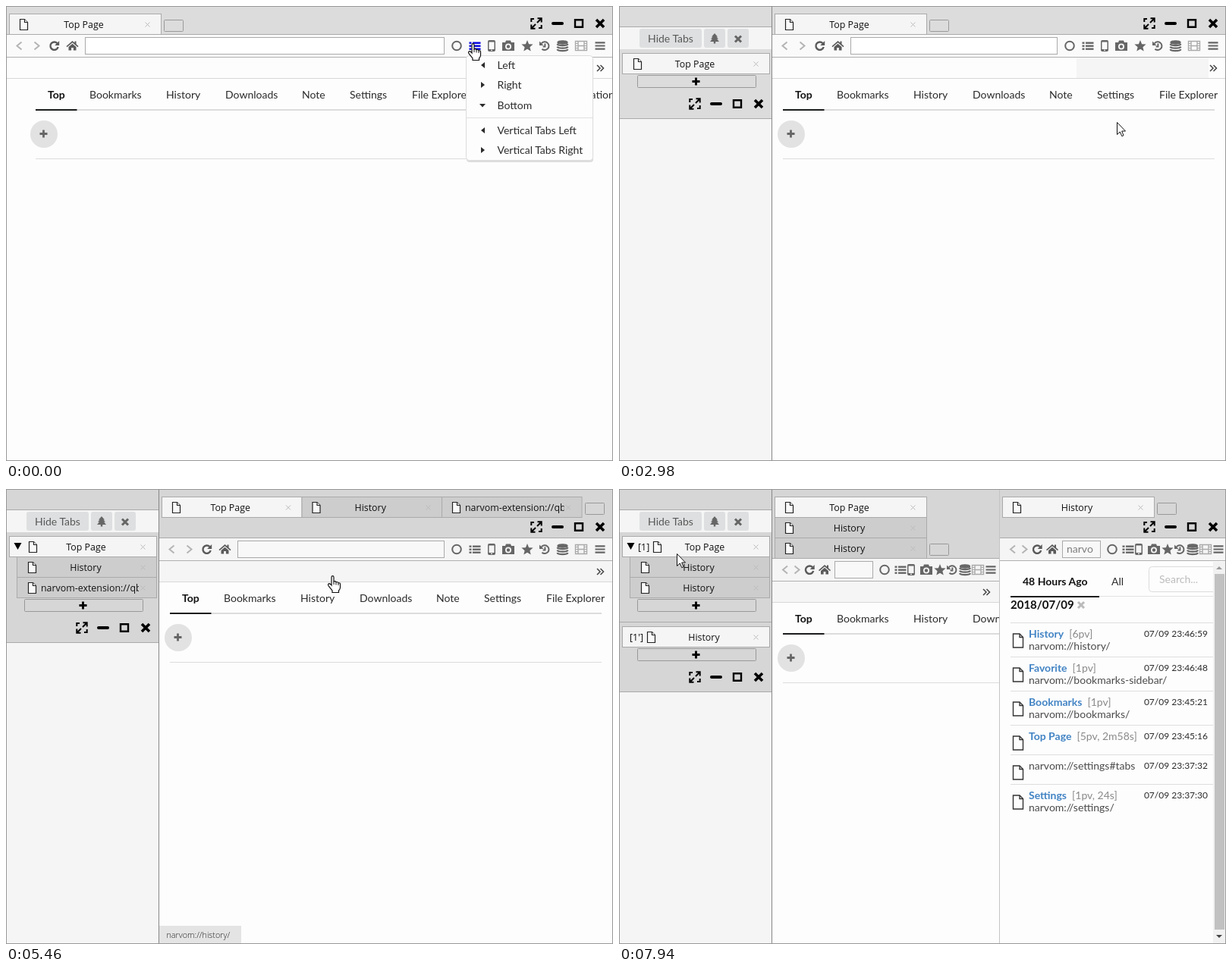
Recreate the animation shown at these times as an HTML page. Size 800 by 600 pixels, loop 8 s.

```html
<!DOCTYPE html>
<html lang="en">
<head>
<meta charset="utf-8">
<title>Vertical tabs</title>
<style>
html, body { margin: 0; width: 100%; height: 100%; overflow: hidden; background: #fdfdfd; }
#stage { display: block; width: 800px; height: 600px; }
text { font: 14px Lato, sans-serif; fill: #2b2b2b; white-space: pre; }
.ui { font: 12.4px "Open Sans", "Noto Sans", sans-serif; fill: #111; }
.status { font: 300 10.8px "Open Sans", "Noto Sans", sans-serif; fill: #222; }
.bold { font-weight: 700; fill: #111; }
.mid { text-anchor: middle; }
.end { text-anchor: end; }
</style>
</head>
<body>
<svg id="stage" viewBox="0 0 800 600"></svg>
<script>
const LOOP = 8000;
const SCHEME = 'narvom';
const EXT = SCHEME + '-extension://qbltmw';
const WHITE = '#fdfdfd', PALE = '#f5f5f5', EDGE = '#999';

// start time, pointer kind, pointer left, pointer top
const STEPS = [
  [0, 'hand', 609, 49], [500, 'arrow', 653, 148], [1000, 'hand', 672, 157],
  [1990, 'arrow', 677, 156], [2490, 'arrow', 667, 154], [2980, 'arrow', 656, 153],
  [3480, 'hand', 435, 120], [3970, 'hand', 424, 114], [4480, 'hand', 424, 114],
  [4960, 'hand', 424, 114], [5460, 'hand', 424, 114], [5960, 'arrow', 428, 114],
  [6460, 'hand', 416, 152], [6950, 'hand', 416, 152], [7450, 'hand', 416, 152],
  [7940, 'arrow', 76, 85]
];

const text = (x, y, s, cls = '', more = '') => `<text x="${x}" y="${y}" class="${cls}" ${more}>${s}</text>`;
const fill = (x, y, w, h, c, r = 0) => `<rect x="${x}" y="${y}" width="${w}" height="${h}" fill="${c}" rx="${r}"/>`;
const box = (x, y, w, h, c, edge, r = 0) =>
  `<rect x="${x + .5}" y="${y + .5}" width="${w - 1}" height="${h - 1}" fill="${c}" stroke="${edge}" rx="${r}"/>`;
const line = (d, w = 2, c = 'currentColor') => `<path d="${d}" fill="none" stroke="${c}" stroke-width="${w}"/>`;
const solid = (d, c = 'currentColor') => `<path d="${d}" fill="${c}" fill-rule="evenodd"/>`;
const clip = (x, y, w, h, s) => `<svg x="${x}" y="${y}" width="${w}" height="${h}" viewBox="${x} ${y} ${w} ${h}">${s}</svg>`;

const starPath = 'M' + Array.from({ length: 10 }, (_, i) => {
  const a = i * Math.PI / 5, r = i % 2 ? 3.6 : 8;
  return `${(r * Math.sin(a)).toFixed(1)} ${(.6 - r * Math.cos(a)).toFixed(1)}`;
}).join('L') + 'Z';

const rows = (x, w) => [-5, -1, 3].map(y => fill(x, y, w, 2.4, 'currentColor')).join('');

const ICONS = {
  back: line('M3 -5L-3 0L3 5'),
  next: line('M-3 -5L3 0L-3 5'),
  reload: line('M4 -3.4A5.2 5.2 0 1 0 5.2 1.5', 2.4) + solid('M6.7 -6.5V-.5H.7Z'),
  home: solid('M0 -6.5L3 -4V-6H5V-2.2L8 .5L7 1.8L0 -4.2L-7 1.8L-8 .5ZM-5 1.5L0 -2.7L5 1.5V6H1.4V2.4H-1.4V6H-5Z'),
  ring: line('M-5.8 0A5.8 5.8 0 1 1 5.8 0A5.8 5.8 0 1 1 -5.8 0Z'),
  list: rows(-7.5, 3) + rows(-3, 10.5),
  phone: solid('M-3 -7.5H3Q5 -7.5 5 -5.5V5.5Q5 7.5 3 7.5H-3Q-5 7.5 -5 5.5V-5.5Q-5 -7.5 -3 -7.5ZM-3.5 -5V4.5H3.5V-5ZM-1 5.3V6.5H1V5.3Z'),
  camera: solid('M-8 -4.5H-4L-3 -7H3L4 -4.5H8V6.5H-8ZM-4 1A4 4 0 1 0 4 1A4 4 0 1 0 -4 1ZM-2.2 1A2.2 2.2 0 1 1 2.2 1A2.2 2.2 0 1 1 -2.2 1Z'),
  star: solid(starPath),
  history: line('M-4.3 -3A5.4 5.4 0 1 1 -3.6 4.2M.4 -3V1H-2.4') + solid('M-7 -6V-.5H-1.5Z'),
  data: solid('M-7 -5C-7 -8 7 -8 7 -5V-3.5C7 -1.2 -7 -1.2 -7 -3.5Z') +
    [-1.5, 2, 5.5].map(y => line(`M-7 ${y - .8}C-6 ${y + 1.8} 6 ${y + 1.8} 7 ${y - .8}`, 2.3)).join(''),
  film: line('M-7.5 -6H7.5V6H-7.5ZM-4 -6V6M4 -6V6M-4 0H4', 1.4) + line('M-7.5 -3H-4M-7.5 0H-4M-7.5 3H-4M4 -3H7.5M4 0H7.5M4 3H7.5', 1.2),
  bars: line('M-6.5 -4.2H6.5M-6.5 0H6.5M-6.5 4.2H6.5', 2.2),
  more: line('M-4 -4L0 0L-4 4M.5 -4L4.5 0L.5 4', 1.5),
  expand: line('M1 -1L6 -6M-1 1L-6 6M1.5 -6.7H6.7V-1.5M-1.5 6.7H-6.7V1.5') + line('M-6.7 -2V-6H-3M6.7 2V6H3'),
  min: fill(-8, -2, 16, 4, 'currentColor', 2),
  max: line('M-5 -4.7H5V4.7H-5Z', 2.4),
  quit: line('M-5 -5L5 5M5 -5L-5 5', 3.6),
  cross: line('M-4 -4L4 4M4 -4L-4 4', 3),
  close: line('M-3 -3L3 3M3 -3L-3 3', 1),
  plus: line('M-5 0H5M0 -5V5', 2.8),
  tree: solid('M0 -7L4 -2.5H2.5L5 .5H3L6 4H1.2V6.5H-1.2V4H-6L-3 .5H-5L-2.5 -2.5H-4Z'),
  left: solid('M3 -4V4L-2 0Z'),
  right: solid('M-2 -4V4L3 0Z'),
  down: solid('M-4 -2H4L0 2.5Z'),
  file: `<g fill="#fafafa" stroke="currentColor" stroke-width="1.2"><path d="M.5 -7H6.5L10.5 -3V7H.5Z"/><path d="M6.5 -7V-3H10.5"/></g>`,
  bigFile: `<g fill="none" stroke="currentColor" stroke-width="1.4"><path d="M-6.5 -9H2L6.5 -4.5V9H-6.5Z"/><path d="M2 -9V-4.5H6.5"/></g>`
};
const icon = (name, x, y, c = '#666') => `<g transform="translate(${x} ${y})" color="${c}">${ICONS[name]}</g>`;

const POINTERS = {
  arrow: `<path d="M.5 .5V16.5L4.3 13L6.8 18.7L9 17.7L6.7 12H11.5Z" fill="#fff" stroke="#111"/>`,
  hand: `<path d="M5 2.4Q5 .6 6.5 .6T8 2.4V8Q10 7 11 8.7Q13 8 14 9.8Q16.5 9.4 16.5 11.5V16Q16.5 18 14.5 20V22.5H6V20L1 13.6Q-.3 11 2 10.7Q3.5 11 5 13Z" fill="#fff" stroke="#111" stroke-width="1.2"/>` +
    line('M8 8V12M11 9V12.5M14 10V13', 1, '#111')
};

function tab(x, y, w, title, on, ix = x + 14, tx = x + w / 2 - 2) {
  const mid = y + 14, end = x + w;
  const label = title === EXT
    ? clip(ix + 17, y, end - 24 - ix - 17, 27, text(ix + 17, mid + 5, title, 'ui'))
    : text(tx, mid + 5, title, 'ui mid');
  return box(x, y, w, 28, on ? PALE : '#cdcdcd', '#aaa') + icon('file', ix, mid + .5, '#222') +
    label + icon('close', end - 18.5, mid + .5, '#bbb');
}

const newTab = (x, y, bar) => box(x, y, 26, 16, bar, EDGE, 1);

const controls = (right, y) => ['quit', 'max', 'min', 'expand']
  .map((n, i) => icon(n, right - 28 * i, y, '#000')).join('');

// Title bar and toolbar of one window; dy is the extra tab height
function chrome(x, right, dy, look, { compact, url = '', busy, hot, ready = true } = {}) {
  const y = 52 + dy, w = right - x;
  const nav = compact ? [18, 33.5, 50, 70] : [17.5, 40.5, 63.5, 87.5];
  const tools = compact ? [149, 170, 184, 204, 222, 238, 255, 272, 289].map(v => v + x)
    : [594, 618, 640, 662, 687, 710, 733.5, 758, 783];
  const names = ['ring', 'list', 'phone', 'camera', 'star', 'history', 'data', 'film', 'bars'];
  const fx = x + (compact ? 83 : 104), fw = compact ? 51 : 578 - fx;
  return fill(x, 0, w, 38 + dy, look.bar) + fill(x, 37 + dy, w, 1, '#aaa') +
    fill(x, 38 + dy, w, 30, look.tool) + fill(x, 67 + dy, w, 1, '#b0b0b0') +
    ['back', 'next', 'reload', 'home'].map((n, i) =>
      icon(n, x + nav[i], y + .5, i < 2 || (busy && i === 2) ? '#b4b4b4' : '#5a5a5a')).join('') +
    box(fx, y - 11, fw, 23, look.field, '#aaa') + text(fx + 6, y + 5, url, '', 'fill-opacity=".6"') +
    names.map((n, i) => icon(n, tools[i], y + .5, hot === n ? '#0000e0' : n === 'film' ? '#aaa' : '#666')).join('') +
    (ready ? fill(x, 68 + dy, w, 27, look.strip) + fill(x, 95 + dy, w, 1, '#d8d8d8') + icon('more', right - 17, 82 + dy, '#444') : '');
}

const MENU = [[71, 'Bookmarks'], [172, 'History'], [250, 'Downloads'], [351, 'Note'],
  [414, 'Settings'], [496, 'File Explorer'], [606, 'Terminal'], [690, 'Automation']];

function startPage(x, right, dy, hover) {
  const w = right - x;
  return fill(x, 136 + dy, w, 2, '#dcdcdc') + (hover ? fill(x + 156, 136 + dy, 78, 2, '#bbb') : '') +
    fill(x, 136 + dy, 54.5, 2, '#1b1c1d') + text(x + 16, 122 + dy, 'Top', 'bold') +
    MENU.map(([dx, s]) => text(x + dx, 122 + dy, s)).join('') +
    `<circle cx="${x + 11}" cy="${169 + dy}" r="18" fill="#e2e2e3"/>` + icon('plus', x + 10.5, 168.5 + dy) +
    fill(x, 201 + dy, w, 1, '#dcdcdc');
}

function popup(active) {
  const items = [['left', 'Left', 78], ['right', 'Right', 104], ['down', 'Bottom', 131],
    ['left', 'Vertical Tabs Left', 164], ['right', 'Vertical Tabs Right', 190]];
  return fill(607, 67, 167, 139, '#ddd', 4) + box(606, 65, 168, 139, WHITE, '#dcdcdc', 4) + fill(607, 147, 166, 1, '#e0e0e0') +
    items.map(([n, s, y], i) => {
      const c = active && i === 3 ? '#000' : '#2b2b2b';
      return icon(n, 628, y, c) + text(647.5, y + 5, s, '', `style="fill:${c}"`);
    }).join('');
}

const addBar = (y, bar) => box(24, y, 157, 17, bar, '#999', 1) + icon('plus', 101.5, y + 8.5, '#000');

function sidebar(titles, split, loaded, look) {
  const n = titles.length, end = 62 + 27 * n, last = split ? 208 : end;
  const [ix, tx] = split ? [45, 113] : n > 1 ? [30, 105.5] : [19, 100];
  return fill(0, 0, 201, 600, PALE) + fill(0, 0, 201, 27, look.bar) + fill(0, 27, 201, 1, '#aaa') +
    fill(0, 57, 201, last + 2, look.bar) + fill(0, last + 59, 201, 600, PALE) + fill(0, last + 59, 201, 1, '#aaa') +
    fill(27, 30, 82, 25, '#dedfe0', 3) + text(68, 48, 'Hide Tabs', 'mid', 'fill-opacity=".75"') +
    fill(112, 30, 28, 25, '#dedfe0', 3) + icon('tree', 126, 43) +
    fill(143, 30, 28, 25, '#dedfe0', 3) + icon('cross', 157, 43.5) +
    tab(4, 62, 195, titles[0], true, ix, tx) +
    (n > 1 ? solid('M10.5 71H20.5L15.5 80Z', '#000') : '') +
    (split ? text(25, 81, '[1]', 'ui') : '') +
    titles.slice(1).map((s, i) => tab(14, 89 + 27 * i, 185, s, false, 29, 105)).join('') +
    addBar(end + 2, look.bar) +
    (split ? fill(0, 175, 201, 1, '#aaa') + tab(4, 181, 195, loaded ? 'History' : EXT, true, 37, 112) +
      text(14, 200, "[1']", 'ui') + addBar(210, look.bar) : '') +
    controls(184, last + 40);
}

const VISITS = [
  [176, 'History', '[6pv]', 'history/', '46:59'],
  [221, 'Favorite', '[1pv]', 'bookmarks-sidebar/', '46:48'],
  [266, 'Bookmarks', '[1pv]', 'bookmarks/', '45:21'],
  [311, 'Top Page', '[5pv, 2m58s]', '', '45:16'],
  [350, '', '', 'settings#tabs', '37:32'],
  [389, 'Settings', '[1pv, 24s]', 'settings/', '37:30']
];

function historyPage() {
  return fill(516, 141, 267, 1, '#e2e2e2') + fill(516, 141, 117, 2, '#1b1c1d') +
    text(532, 127, '48 Hours Ago', 'bold') + text(649, 127, 'All') +
    clip(690, 96, 93, 50, box(698, 102, 110, 34, WHITE, '#dcdcdc', 4) + text(712, 124, 'Search...', '', 'style="fill:#bbb"')) +
    text(516, 158, '2018/07/09', 'bold', 'style="font-size:15px"') + icon('cross', 609, 153, '#bbb') +
    VISITS.map(([y, name, count, path, time]) =>
      fill(516, y, 267, 1, '#dedede') + icon('bigFile', 526, y + 24, '#333') +
      `<text x="540" y="${y + 20}"><tspan font-weight="700" fill="#4183c4">${name}</tspan><tspan dx="7" fill="#8a8a8a">${count}</tspan></text>` +
      (path ? text(540, y + (name ? 36 : 20), `${SCHEME}://${path}`, '', 'fill-opacity=".85"') : '') +
      text(776, y + 19, '07/09 23:' + time, 'end', 'style="font-size:12px"')).join('') +
    fill(783, 96, 16, 503, '#f1f1f1') + fill(785, 112, 13, 469, '#c1c1c1') +
    solid('M787 106H795L791 102Z', '#999') + solid('M787 588H795L791 592Z', '#444');
}

const status = (x, w, s) => fill(x, 576, w, 23, '#e4e4e4') + text(x + 9.5, 592, s, 'status');

function scene([t, kind, px, py]) {
  const side = t >= 1990, late = t >= 5460, split = t >= 6950, loaded = t >= 7450;
  const click = t === 3970 || t === 4960;
  const hovering = (t >= 3480 && t < 5960) || (t >= 6460 && t < 7940);
  const look = late ? { bar: '#d6d6d6', tool: PALE, strip: PALE, field: '#f8f8f8' }
    : { bar: '#dcdcdc', tool: '#fafafa', strip: WHITE, field: '#fff' };
  const titles = ['Top Page'];
  if (t >= 4480) titles.push('History');
  if (late) titles.push(t < 5960 ? EXT : 'History');

  const x = side ? 201 : 0, right = split ? 501 : 800, dy = split ? 54 : late ? 27 : 0;
  const n = titles.length, tw = n < 3 || split ? 201 : 185.5;
  let s = fill(0, 0, 800, 600, WHITE);
  let win = chrome(x, right, dy, look, { compact: split, hot: t < 500 ? 'list' : '' });
  titles.forEach((name, i) => {
    win += split ? tab(x + 4, 10 + 27 * i, tw, name, !i) : tab(x + 4 + i * (tw - 1), 10, tw, name, !i);
  });
  win += split ? newTab(x + 208, 72, look.bar) : newTab(x + 7 + n * (tw - 1) + (n < 3 ? 1 : 1.5), 18, look.bar);
  if (!split) win += controls(783, late ? 50 : 23);
  if (side && !late) win += fill(603, 68, 174, 27, PALE);
  win += startPage(side ? 216 : 39, side ? 785 : 761, dy, click);
  s += clip(x, 0, right - x, 600, win);

  if (side) s += sidebar(titles, split, loaded, look) + fill(201, 0, 1, 600, '#888');
  if (split) {
    s += chrome(501, 800, 27, look, { compact: true, url: SCHEME.slice(0, 5), busy: !loaded, ready: false }) +
      tab(505, 10, 201, loaded ? 'History' : EXT, true) + newTab(709, 18, look.bar) + controls(783, 50) +
      (loaded ? historyPage() : fill(502, 95, 298, 28, '#f8f8f8') + status(502, 68, 'Loading...')) +
      fill(501, 0, 1, 600, '#c4c4c4');
  } else if (!side) s += popup(t === 1000);

  if (hovering) s += status(202, 108, SCHEME + '://history/');
  s += box(0, 0, 800, 600, 'none', EDGE);
  if (click) s += '<circle cx="430.5" cy="114" r="12" fill="#fff000" fill-opacity=".65"/>';
  return s + `<g transform="translate(${px} ${py})">${POINTERS[kind]}</g>`;
}

const stage = document.getElementById('stage');
let shown, begin;
function draw(now) {
  begin ??= now;
  const t = (now - begin) % LOOP;
  const step = STEPS.findLast(([at]) => at <= t);
  if (step !== shown) stage.innerHTML = scene(shown = step);
  requestAnimationFrame(draw);
}
draw(performance.now());
</script>
</body>
</html>
```
